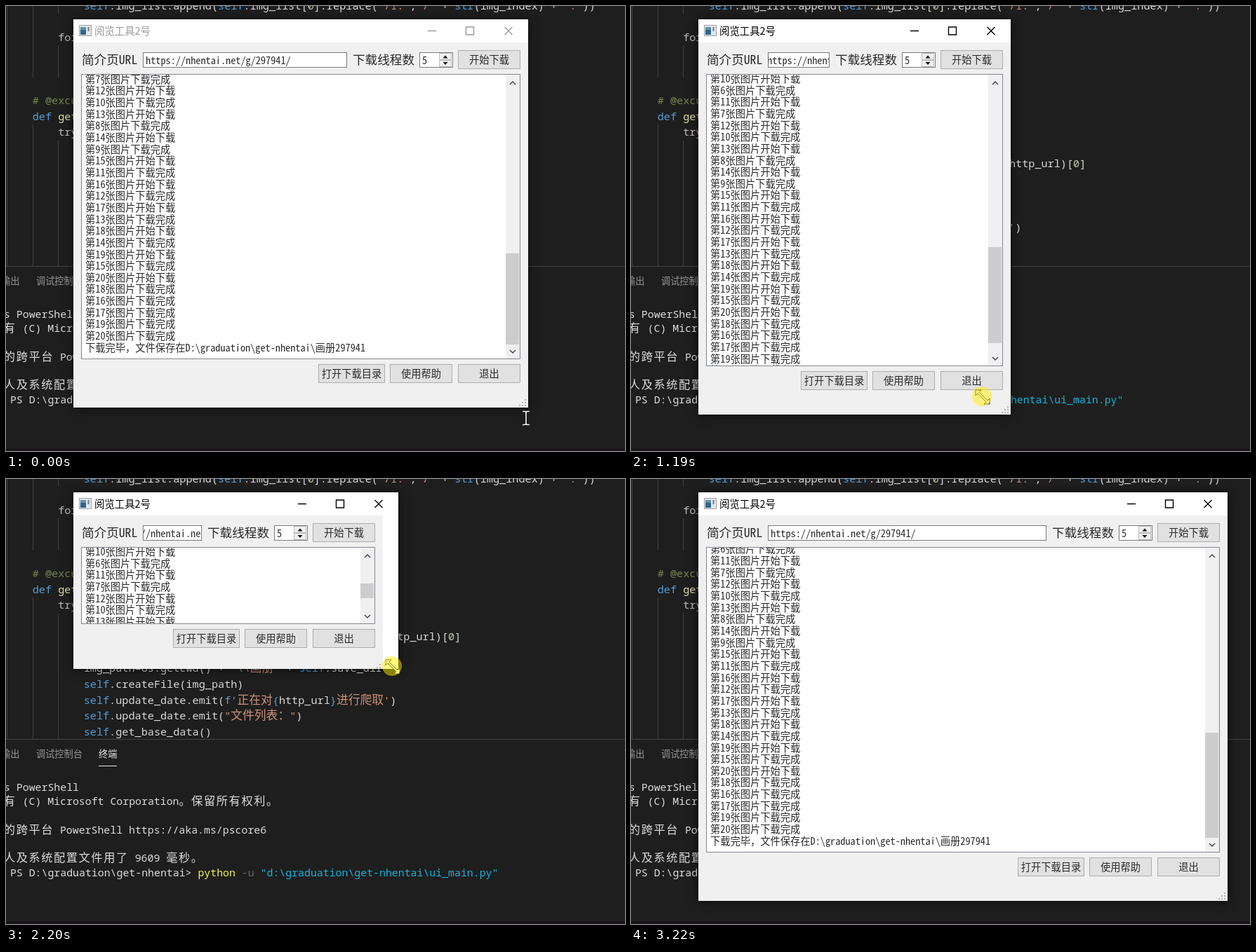
These frames come from a looping animation (882x635 px, 3430 ms). An HTML page:

```html
<!DOCTYPE html>
<html lang="zh-CN">
<head>
<meta charset="utf-8">
<style>
html, body { margin: 0; width: 100%; height: 100%; overflow: hidden; background: #1e1e1e; }
div, svg { position: absolute; box-sizing: border-box; white-space: pre; }
#stage { left: 0; top: 0; width: 882px; height: 635px; overflow: hidden; }
#editor { left: 0; top: 0; width: 882px; height: 372px; overflow: hidden; border-bottom: 1px solid #444; }
#code { left: 1.3px; top: -12.3px; font: 15.2px/22.57px "Noto Sans Mono", monospace; color: #d8d8d8; }
#term { left: -56.5px; top: 429px; font: 14.87px/20.25px "Noto Sans Mono", monospace; color: #dcdcdc; }
i { font: 300 16.8px/0 "Noto Sans CJK SC", "Noto Sans CJK", sans-serif; }
#term i { font-size: 16.2px; letter-spacing: 1.6px; }
.tab { font: 13.2px/20px "Noto Sans CJK SC", "Noto Sans CJK", sans-serif; color: #969696; top: 382px; }
.on { color: #e7e7e7; height: 28px; border-bottom: 1px solid; }
.key { color: #569cd6; } .str { color: #ce9178; } .num { color: #b5cea8; } .var { color: #d8d8d8; }
.flow { color: #c3b9c3; } .note { color: #77864f; } .fn { color: #dcdcaa; }
.cmd { color: #f5f543; } .opt { color: #666; } .arg { color: #16b4dc; }
.guide { width: 1px; height: 22.57px; background: #404040; }
#win { left: 96px; top: 19px; overflow: hidden; background: #fff; color: #000; box-shadow: 0 1px 13px rgba(0,0,0,.65); }
#win.idle { color: #999; }
#title { left: 30px; top: 5px; font: 14.4px/22px "Noto Sans CJK SC", "Noto Sans CJK", sans-serif; }
#body { left: 0; top: 33px; background: #f0f0f0; color: #2a2a2a; overflow: hidden;
  font: 300 14.25px/16.65px "Noto Sans Mono CJK SC", "Noto Sans CJK SC", "Noto Sans CJK", monospace; }
.label { font-size: 17.6px; line-height: 22px; top: 13px; }
.field { top: 14px; height: 22px; border: 1px solid #7a7a7a; background: #fff; overflow: hidden; }
.field div { top: 2px; left: 3px; }
.btn { width: 89px; height: 27px; border: 1px solid #adadad; background: #e1e1e1; text-align: center; line-height: 23px; }
.foot { bottom: 35px; }
#list { left: 11px; right: 11px; top: 45px; bottom: 69px; border: 1px solid #828790; background: #fff; overflow: hidden; }
#log { left: 5px; }
#bar { right: 0; top: 0; bottom: 0; width: 20px; background: #f0f0f0; }
#bar svg { left: 5px; fill: none; stroke: #484858; stroke-width: 1.5; }
#thumb { left: 0; width: 19px; background: #cdcdcd; }
#pointer { left: 0; top: 0; }
</style>
</head>
<body>
<div id="stage">
  <div id="editor"><div id="code"></div></div>
  <div class="tab" style="left:-7px">输出</div>
  <div class="tab" style="left:43px">调试控制台</div>
  <div class="tab on" style="left:132px">终端</div>
  <div id="term"></div>
  <div style="top:631px;width:882px;height:4px;background:#191419"></div>

  <div id="win">
    <svg style="left:8px;top:8px" width="18" height="16">
      <path d="M.5 .5h17v15h-17z" fill="#e4e7ea" stroke="#9aa0a6"/>
      <path d="M2 3h8v11h-8z" fill="#2f6690"/><path d="M2 3h8v4h-8z" fill="#5f93ad"/>
      <path d="M13.5 3v6" stroke="#777" stroke-width="2"/>
    </svg>
    <div id="title">阅览工具2号</div>
    <svg style="right:20px;top:8px" width="126" height="16" fill="none" stroke="currentColor" stroke-width="1.4">
      <path d="M3 8.5h12M57.5 3h11v11h-11zM112.5 3l11 11m0-11l-11 11"/>
    </svg>
    <div id="body">
      <div class="label" style="left:12px">简介页URL</div>
      <div class="field" style="left:99px;right:258px"><div id="url">https://nhentai.net/g/297941/</div></div>
      <div class="label" style="left:calc(100% - 250px)">下载线程数</div>
      <div class="field" style="right:107px;width:48px"><div>5</div>
        <svg style="right:0;top:0" width="19" height="20" fill="#f0f0f0" stroke="#bbb">
          <path d="M.5 .5h17v9h-17zM.5 10.5h17v9h-17z"/>
          <path d="M5.5 7.5l3.500-4 3.500 4zM5.5 13l3.500 4 3.500-4z" fill="#111" stroke="none"/>
        </svg>
      </div>
      <div class="btn" style="right:11px;top:11px">开始下载</div>
      <div id="list">
        <div id="log"></div>
        <div id="bar">
          <div id="thumb"></div>
          <svg style="top:9px" width="10" height="6"><path d="M1 5l4-4 4 4"/></svg>
          <svg style="bottom:7px" width="10" height="6"><path d="M1 1l4 4 4-4"/></svg>
        </div>
      </div>
      <div class="btn foot" style="right:204px;width:95px">打开下载目录</div>
      <div class="btn foot" style="right:108px">使用帮助</div>
      <div class="btn foot" style="right:11px">退出</div>
      <svg style="right:2px;bottom:1px" width="12" height="12" fill="#b5b5b5">
        <path d="M9 1h2v2h-2zM5 5h2v2h-2zM9 5h2v2h-2zM1 9h2v2h-2zM5 9h2v2h-2zM9 9h2v2h-2z"/>
      </svg>
    </div>
  </div>

  <svg id="pointer" width="882" height="635">
    <defs><path id="bar-shape" d="M-5-9.5h3.5l1.5 1 1.5-1h3.5M0-8v16M-5 9.5h3.5l1.5-1 1.5 1h3.5"/></defs>
    <g id="beam" transform="translate(741 588)" fill="none">
      <use href="#bar-shape" stroke="#111" stroke-width="3.5"/>
      <use href="#bar-shape" stroke="#fff" stroke-width="1.6"/>
    </g>
    <g id="drag">
      <path transform="translate(1 1)" d="M-10-10h8l-3 3 12 12 3-3v8h-8l3-3-12-12-3 3z" fill="#fff" stroke="#222"/>
      <circle id="glow" r="14" fill="#fff000" fill-opacity=".5"/>
    </g>
  </svg>
</div>
<script>
const $ = id => document.getElementById(id);
const tint = (cls, s) => `<span class=${cls}>${s}</span>`;
const wide = s => s.replace(/[\u3001-\u9fff\uff00-\uffef]+/g, '<i>$&</i>');

const syntax = /(?<note>#.*)|(?<str>"[^"]*"|'[^']*')|(?<key>\b(?:self|str|def)\b|\bf(?='))|(?<flow>\b(?:for|try)\b)|(?<fn>(?<=def )\w+)|(?<num>(?<=\[)\d)/g;
const paint = s => s
  .replace(syntax, (m, ...rest) => {
    const groups = rest.at(-1);
    return tint(Object.keys(groups).find(k => groups[k]), m);
  })
  .replace(/\{(\w+)\}/, (_, v) => tint('key', '{') + tint('var', v) + tint('key', '}'));

const code = String.raw`            self.img_list.append(self.img_list[0].replace("/1.","/" + str(img_index) + "."))

        for



    # @excute
    def get
        try

${'http_url)[0]'.padStart(71)}

            img_path=os.getcwd() + "\\画册" + self.save_dir
            self.createFile(img_path)
            self.update_date.emit(f'正在对{http_url}进行爬取')
            self.update_date.emit("文件列表：")
            self.get_base_data()`;
$('code').innerHTML = wide(paint(code));

// one digit per code row: how many indent guides cross it
[...'32233111233333333'].forEach((depth, row) => {
  for (let i = 0; i < depth; i++) {
    const guide = document.createElement('div');
    guide.className = 'guide';
    guide.style.cssText = `left:${Math.round(1 + 36.5 * i)}px;top:${22.57 * row - 11.3}px`;
    $('editor').append(guide);
  }
});

$('term').innerHTML = wide(String.raw`Windows PowerShell
版权所有 (C) Microsoft Corporation。保留所有权利。

尝试新的跨平台 PowerShell https://aka.ms/pscore6

加载个人及系统配置文件用了 9609 毫秒。
       PS D:\graduation\get-nhentai> ${tint('cmd', 'python')} ${tint('opt', '-u')} ${tint('arg', String.raw`"d:\graduation\get-nhentai\ui_main.py"`)}`);

// each finished picture lets the next one start, up to 20
const finished = [6, 7, 10, 8, 9, 11, 12, 13, 14, 15, 18, 16, 17, 19, 20];
$('log').textContent = finished.map((n, i) =>
  (i <= 10 ? `第${i + 10}张图片开始下载\n` : '') + `第${n}张图片下载完成\n`).join('') +
  '下载完毕，文件保存在D:\\graduation\\get-nhentai\\画册297941';

// window corner at each step; optional pointer offset and content lag
const start = [744, 573];
const path = [
  start, start, start, [722, 556], [659, 393, -3, -8], [733, 474], [541, 583, -41, -26],
  [541, 262], [587, 360], [630, 505], [549, 409], [559, 271, -9, -4, 22, -5],
  [762, 384], [745, 536], [762, 570, 8, -1], [850, 602], [850, 602],
];
const clamp = (v, lo, hi) => Math.max(lo, Math.min(hi, v));
const px = (id, props) => { for (const k in props) $(id).style[k] = props[k] + 'px'; };
const show = (id, on) => $(id).style.display = on ? '' : 'none';

function draw(t) {
  const step = Math.min(16, Math.floor((t + 24) / 202));
  const [right, bottom, dx = -9, dy = -4, lagX = 0, lagY = 0] = path[step];
  const w = right - lagX, h = bottom - lagY, dragging = step > 2;
  px('win', { width: right - 96, height: bottom - 19 });
  px('body', { width: w - 96, height: h - 52 });
  px('url', { left: 3 - Math.max(0, Math.min(9 * step - 49, 661 - w)) });
  $('win').className = dragging ? '' : 'idle';

  // a narrower window shows earlier log rows, never past the end of the log
  const total = 1140, page = h - 169, track = h - 207;
  const rows = dragging ? Math.max(1, Math.round((750 - w) / 65)) : 0;
  const scroll = clamp(736 - 16.4 * rows, 0, total - page);
  px('log', { top: 683.7 - scroll - 736 });
  px('log', { top: -52.3 + 736 - scroll });
  const size = Math.max(21, track * page / total);
  px('thumb', { top: Math.round(19 + (track - size) * scroll / (total - page)), height: Math.round(size) });

  show('beam', step == 0);
  show('drag', step > 0 && step < 16);
  show('glow', dragging);
  $('drag').setAttribute('transform', `translate(${right + dx} ${bottom + dy})`);
}
function tick() {
  draw(performance.now() % 3430);
  requestAnimationFrame(tick);
}
tick();
</script>
</body>
</html>
```
